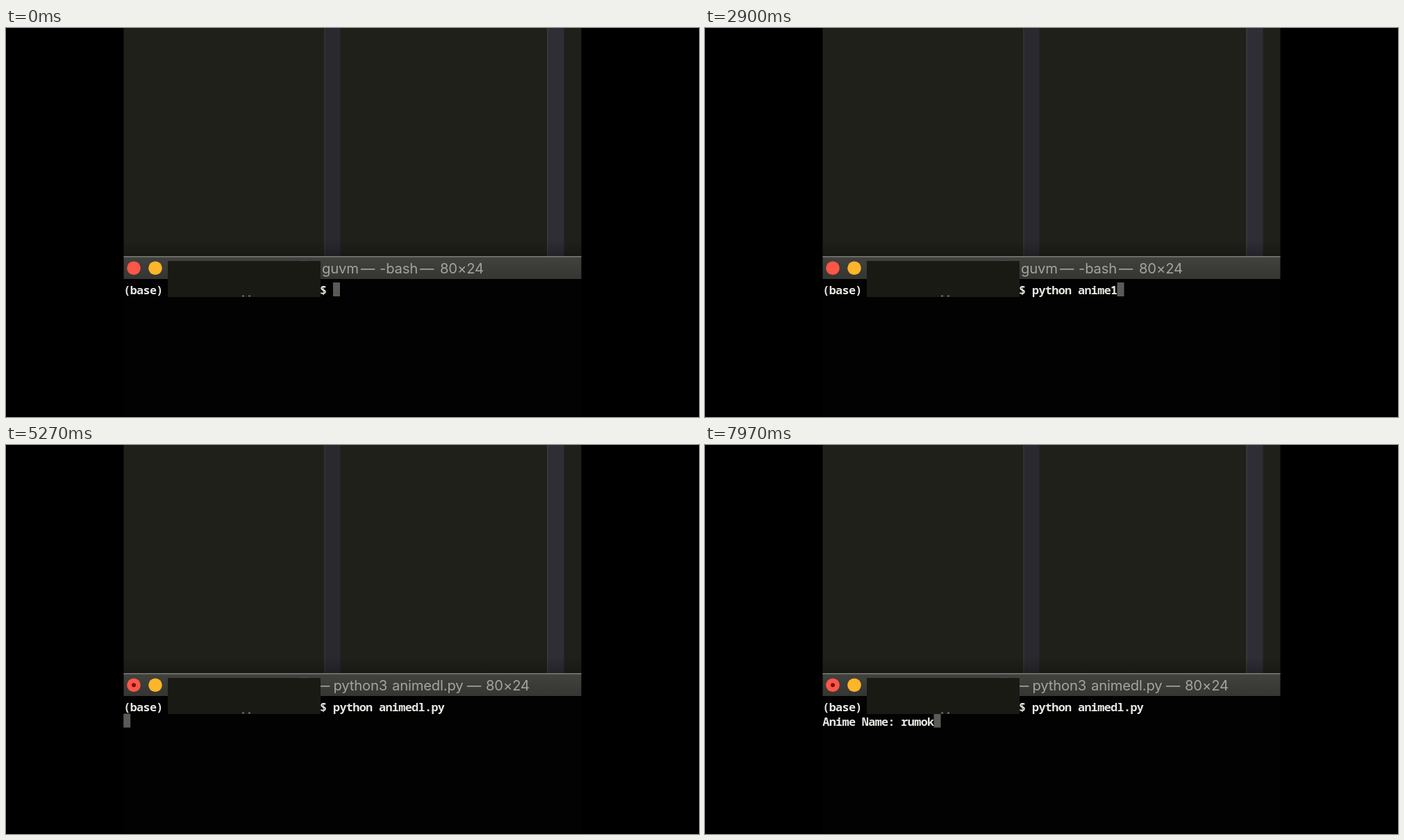
Animation of 998 by 561 pixels, one loop 8 s. Source, as an HTML page:

```html
<!DOCTYPE html>
<html lang="en">
<head>
<meta charset="utf-8">
<title>Terminal session</title>
<style>
  html, body { margin: 0; width: 100%; height: 100%; overflow: hidden; background: #000; }
  svg { display: block; width: 100vw; height: 100vh; }
  text { white-space: pre; }
  .mono { font: 600 16.8px "Noto Sans Mono", "DejaVu Sans Mono", monospace; fill: #e6e6e2; }
  .title { font: 400 20.3px Inter, Roboto, sans-serif; fill: #a3a39f; letter-spacing: -.2px; }
</style>
</head>
<body>
<svg viewBox="0 0 998 561">
  <defs>
    <linearGradient id="bar" x2="0" y2="1">
      <stop offset="0" stop-color="#42423f"/>
      <stop offset="1" stop-color="#353532"/>
    </linearGradient>
    <linearGradient id="shadow" x2="0" y2="1">
      <stop offset="0" stop-opacity="0"/>
      <stop offset="1" stop-opacity=".25"/>
    </linearGradient>
  </defs>
  <rect width="998" height="561"/>

  <!-- editor behind the terminal -->
  <rect x="169.5" width="659" height="329" fill="#20201b"/>
  <rect x="458" width="23.5" height="329" fill="#29292f"/>
  <rect x="458" width="2" height="329" fill="#32322d"/>
  <rect x="779" width="24.5" height="329" fill="#2f2e37"/>
  <rect x="779" width="2" height="329" fill="#383834"/>
  <rect x="169.5" y="305" width="659" height="24" fill="url(#shadow)"/>

  <!-- terminal window -->
  <rect x="169.5" y="362" width="659" height="199" fill="#020203"/>
  <rect x="169.5" y="329" width="659" height="33" fill="url(#bar)"/>
  <rect x="169.5" y="329" width="659" height="1.5" fill="#7c7c78"/>
  <circle cx="184" cy="346.3" r="9.8" fill="#fc5648"/>
  <circle id="busy" cx="184" cy="346.3" r="3" fill="#7c0d08"/>
  <circle cx="215" cy="346.3" r="9.8" fill="#fdb52a"/>
  <g id="titleIdle" class="title"></g>
  <g id="titleBusy" class="title"></g>

  <rect id="cursor" width="10" height="20" fill="#5b5b56"/>
  <g id="lines" class="mono"></g>

  <!-- blanked-out area -->
  <rect x="233" y="336" width="220" height="52" fill="#1a1a15"/>
  <rect x="423" y="335" width="12" height="1" fill="#3d4a62"/>
  <path d="M340 386.5h3m6 0h3" stroke="#8c8c86" stroke-width="1.3"/>
</svg>
<script>
const LOOP = 8000, CELL = 9.43, LEFT = 169.5, PROMPT_COL = 30;
const COMMAND = 'python animedl.py', QUESTION = 'Anime Name: ';
const $ = id => document.getElementById(id);

function addText(parent, x, y, content = '') {
  const el = document.createElementNS('http://www.w3.org/2000/svg', 'text');
  el.setAttribute('x', x);
  el.setAttribute('y', y);
  el.textContent = content;
  return parent.appendChild(el);
}

// Places every character in its own terminal cell.
function setCells(el, col, content) {
  const xs = [...content].map((_, i) => (LEFT + (col + i) * CELL - .3).toFixed(2));
  el.setAttribute('x', xs.join(' '));
  el.textContent = content;
}

const addTitle = (group, parts) => parts.forEach(([x, s]) => addText(group, x, 354.3, s));
addTitle($('titleIdle'), [[455, 'guvm'], [511, '—'], [538, '-bash'], [596, '—'], [625, '80×24']]);
addTitle($('titleBusy'), [[446, '—'], [471.5, 'python3'], [556, 'animedl.py'], [664, '—'], [691, '80×24']]);

setCells(addText($('lines'), 0, 384), 0, '(base)');
const promptLine = addText($('lines'), 0, 384);
const answerLine = addText($('lines'), 0, 404.5);

// [time, command typed so far, second line (null until the program runs)]
const steps = [[0, '', null]];
[500, 650, 800, 940, 1090, 1240, 1420, 1740, 1920, 2100, 2300, 2480]
  .forEach((t, i) => steps.push([t, COMMAND.slice(0, i + 1), null]));
steps.push([2700, 'python anime1', null], [3300, 'python anime', null]);
[3560, 3760, 4020, 4260, 4520]
  .forEach((t, i) => steps.push([t, COMMAND.slice(0, i + 13), null]));
steps.push([4950, COMMAND, ''], [5700, COMMAND, QUESTION]);
[6080, 6300, 6520, 7080, 7600]
  .forEach((t, i) => steps.push([t, COMMAND, QUESTION + 'rumok'.slice(0, i + 1)]));

function show([, command, answer]) {
  const running = answer !== null;
  setCells(promptLine, PROMPT_COL, '$ ' + command);
  setCells(answerLine, 0, answer || '');
  const col = running ? answer.length : PROMPT_COL + 2 + command.length;
  $('cursor').setAttribute('x', LEFT + col * CELL - .3);
  $('cursor').setAttribute('y', running ? 387.5 : 367);
  $('busy').style.display = $('titleBusy').style.display = running ? '' : 'none';
  $('titleIdle').style.display = running ? 'none' : '';
}

const start = performance.now();
let current;
function tick(now) {
  const t = Math.max(0, now - start) % LOOP;
  const step = steps.findLast(s => s[0] <= t);
  if (step !== current) show(current = step);
  requestAnimationFrame(tick);
}
tick(start);
</script>
</body>
</html>
```
